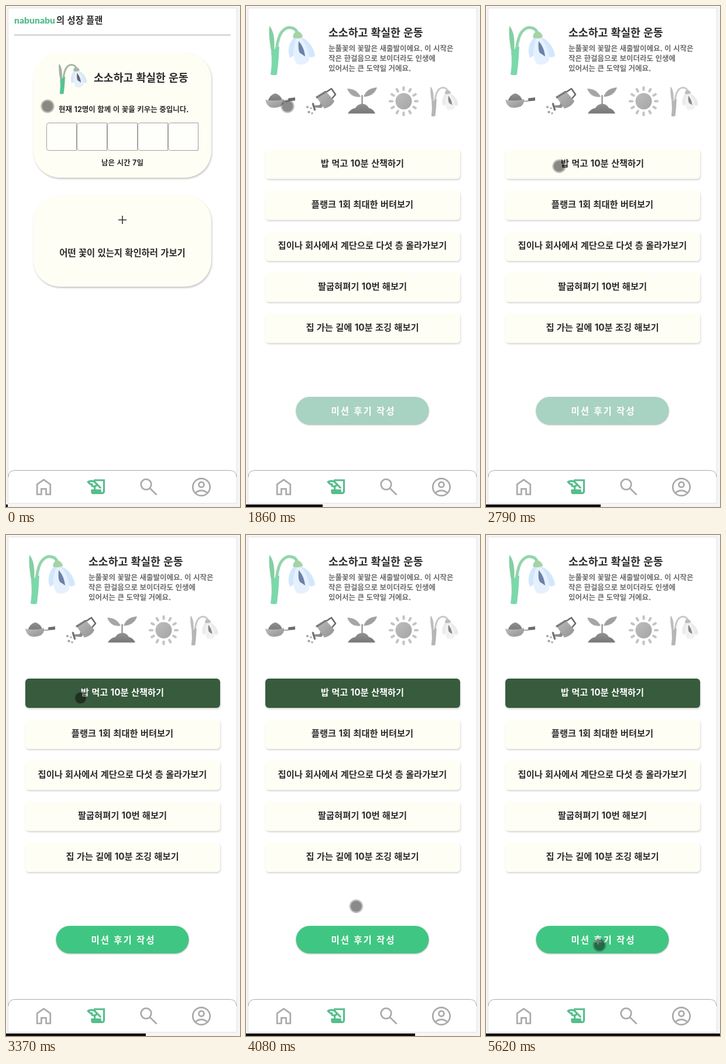
An HTML page for the animation above (5660 ms loop, 400 px wide and 855 px high).

```html
<!DOCTYPE html>
<html lang="ko">
<head>
<meta charset="utf-8">
<title>성장 플랜</title>
<style>
  html, body { margin: 0; width: 100%; height: 100%; overflow: hidden; background: #f5f5f5; }
  svg { display: block; width: 400px; height: 855px; }
  text { font-family: "Noto Sans CJK KR", "Noto Sans CJK", "Noto Sans KR", "Noto Sans", sans-serif; fill: #2c2c2c; }
  .num { font-family: Inter, sans-serif; }
  .brand { font-family: Lato, "Open Sans", sans-serif; font-weight: 900; fill: #55bd8c; }
  .card { fill: #fefef4; filter: drop-shadow(1px 2px 1.5px rgba(0, 0, 0, .24)); }
  .task { fill: #fefef4; filter: drop-shadow(1px 2px 1.5px rgba(0, 0, 0, .16)); }
  .send { fill: #a8d2c2; filter: drop-shadow(0 1.5px 1.2px rgba(0, 0, 0, .32)); }
  .done .first .task { fill: #375b3c; }
  .done .first text { fill: #fff; }
  .done .send { fill: #40c683; }
  .nav { fill: none; stroke: #a9a9a9; stroke-width: 2.7; }
</style>
</head>
<body>
<svg id="stage" viewBox="0 0 400 855" xmlns="http://www.w3.org/2000/svg">
  <defs>
    <linearGradient id="metal" x1="0" y1="0" x2="1" y2="1">
      <stop offset="0" stop-color="#bcbcbc"/><stop offset="1" stop-color="#929292"/>
    </linearGradient>
    <linearGradient id="glow" x1="0" y1="0" x2="1" y2="1">
      <stop offset="0" stop-color="#bdbdbd"/><stop offset="1" stop-color="#a5a5a5"/>
    </linearGradient>
    <linearGradient id="soil" x1="0" y1="0" x2="0" y2="1">
      <stop offset="0" stop-color="#929292"/><stop offset="1" stop-color="#777"/>
    </linearGradient>
  </defs>
  <rect x="3.5" y="3.5" width="391" height="845" fill="#fff" stroke="#e2e2e2"/>
  <g id="home"></g>
  <g id="plan"></g>
  <g id="nav">
    <path d="M4 848V804Q4 792.5 16 792.5H382Q394 792.5 394 804V848Z" fill="#fff"/>
    <path d="M4 804Q4 792.5 16 792.5H382Q394 792.5 394 804" fill="none" stroke="#aaa"/>
    <g class="nav">
      <path d="M53.2 833.5V816.5L64.5 808.5L75.8 816.5V833.5H68.6V824.2H60.4V833.5Z"/>
      <circle cx="239.5" cy="816.5" r="8.8"/>
      <path d="M246 823L257.5 834.3"/>
      <circle cx="334" cy="821" r="14.7"/>
      <circle cx="334" cy="816.8" r="4.5"/>
      <path d="M324 831C329.5 825.6 338.5 825.6 344 831"/>
    </g>
    <path transform="translate(135.8 801.3) scale(1.583)" fill="#55bd8c" d="M9 4v1.38c-.83-.33-1.72-.5-2.61-.5-1.79 0-3.58.68-4.95 2.05l3.33 3.33h1.11v1.11c.86.86 1.98 1.31 3.11 1.36V15H6v3c0 1.1.9 2 2 2h10c1.66 0 3-1.34 3-3V4H9zm-1.11 6.41V8.26H5.61L4.57 7.22a5.07 5.07 0 0 1 1.82-.34c1.34 0 2.59.52 3.54 1.46l1.41 1.41-.2.2a2.7 2.7 0 0 1-1.92.8c-.47 0-.93-.12-1.33-.34zM19 17c0 .55-.45 1-1 1s-1-.45-1-1v-2h-6v-2.59c.57-.23 1.1-.57 1.56-1.03l.2-.2L15.59 14H17v-1.41l-6-5.97V6h8v11z"/>
  </g>
  <g id="cursor">
    <circle r="9.4" fill="#000" fill-opacity=".46"/>
    <circle r="10.5" fill="none" stroke="#444" stroke-opacity=".36" stroke-width="2.2"/>
  </g>
  <rect id="bar" x="0" y="850.7" height="4.3" fill="#0a0a0a"/>
</svg>
<script>
const $ = id => document.getElementById(id);

// Text placed by its vertical centre, digits in a sans without foot serifs
const label = (x, cy, str, size, { anchor = 'middle', extra = '' } = {}) =>
  `<text x="${x}" y="${cy + size * .37}" font-size="${size}" font-weight="700" text-anchor="${anchor}" ${extra}>` +
  str.replace(/\d+/g, '<tspan class="num">$&</tspan>') + '</text>';
const start = { anchor: 'start' };

// Snowdrop drawn in an 80 by 85 box
const flower = (x, y, scale, c) => `
  <g transform="translate(${x} ${y}) scale(${scale})">
    <path d="M11 60C12 46 13 35 17 22C21 9 30 2 38 4C44 5 48 9 49 14" fill="none" stroke="${c.stalk}" stroke-width="5" stroke-linecap="round"/>
    <path d="M1 1C8 8 11 24 9 46L6 54C3 38-1 17 1 1Z" fill="${c.leaf}"/>
    <path d="M4 46Q10 39 18 36Q17 60 14 84Q8 86 3 84Q6 64 4 46Z" fill="${c.sheath}"/>
    <path d="M45 20C35 27 31 42 36 55C43 54 52 40 51 22Z" fill="${c.petal2}"/>
    <path d="M52 20C65 22 77 36 79 52C75 57 64 54 58 46Z" fill="${c.petal2}"/>
    <path d="M48 21C41 34 39 55 48 66C60 69 69 64 69 57C68 40 61 25 52 20Z" fill="${c.petal}"/>
    <path d="M51 27C50 37 51 44 53 47L62 53C61 43 57 33 51 27Z" fill="${c.mark}"/>
    <path d="M42 16Q45 8 52 11Q58 15 58 20Q50 24 41 21Z" fill="${c.cap}"/>
  </g>`;

const tints = {
  dim: { stalk: '#a3b9a9', leaf: '#9fafa4', sheath: '#56c394', petal: '#e4f0fd', petal2: '#d6e8fa', mark: '#64676b', cap: '#abb6a5' },
  fresh: { stalk: '#93d5ac', leaf: '#83cfa1', sheath: '#7bd8a9', petal: '#e6f1ff', petal2: '#d2e7fd', mark: '#6d80a6', cap: '#a5d3a6' },
  gray: { stalk: '#c9c9c9', leaf: '#bcbcbc', sheath: '#b5b5b5', petal: '#f2f2f2', petal2: '#e9e9e9', mark: '#85888f', cap: '#bdbdbd' }
};

const slots = [0, 1, 2, 3, 4].map(i => {
  const x = 69.5 + 52 * i;
  return `<path d="M${x + 51} 199.5H${x + 4}Q${x} 199.5 ${x} 203.5V242.5Q${x} 246.5 ${x + 4} 246.5H${x + 51}Z" fill="#fefefa" stroke="#a0a0a0"/>`;
}).join('');

$('home').innerHTML = `
  <text class="brand" x="14" y="29.5" font-size="15.7">nabunabu</text>
  ${label(86, 24, '의 성장 플랜', 15.4, start)}
  <path d="M14 49.5H384" stroke="#a0a0a0"/>
  <rect class="card" x="47" y="80" width="304" height="213" rx="45"/>
  ${flower(90, 98, .615, tints.dim)}
  ${label(150, 122, '소소하고 확실한 운동', 18.3, start)}
  ${label(90, 176, '현재 12명이 함께 이 꽃을 키우는 중입니다.', 12.5, start)}
  ${slots}
  ${label(199, 267, '남은 시간 7일', 12.5)}
  <rect class="card" x="47" y="323" width="304" height="156" rx="45"/>
  <path d="M192 365H206M199 358V372" stroke="#333" stroke-width="1.6"/>
  ${label(199, 421, '어떤 꽃이 있는지 확인하러 가보기', 15.4)}`;

const trowel = `
  <path d="M37 163Q41 151 50 149Q59 151 63 163Z" fill="url(#soil)"/>
  <path d="M33 160Q48 163 65 159Q66 166 60 171Q48 176 40 172Q34 167 33 160Z" fill="url(#metal)"/>
  <path d="M63 162.5H70Q73 162.5 73 159.5" fill="none" stroke="#a5a5a5" stroke-width="2.2"/>
  <path d="M72 157.5L84 156V161.5L73 162.5Z" fill="#6c6c6c"/>`;

const can = `
  <path d="M137 147L146 141L153 151L146 159" fill="none" stroke="#6a6a6a" stroke-width="2.6" stroke-linejoin="round"/>
  <path d="M136 164L129 174L115 173V170L126 169L129 160Z" fill="#8c8c8c"/>
  <path d="M120 155L136 145L151 162Q148 171 134 175Z" fill="url(#metal)"/>
  <path d="M119 155L136 144.5L138 147L121 158Z" fill="#7c7c7c"/>
  <path d="M114.5 167L117.5 177" stroke="#747474" stroke-width="3.4" stroke-linecap="round"/>
  <g fill="#a6a6a6"><circle cx="105" cy="172.5" r="2.1"/><circle cx="111" cy="174.5" r="1.6"/><circle cx="107.5" cy="181" r="2.2"/><circle cx="113" cy="183" r="1.7"/></g>`;

const sprout = `
  <path d="M198.5 169V152" stroke="#8c8c8c" stroke-width="2.2"/>
  <path d="M173 141Q189 141 196 155Q179 157 173 141Z" fill="#a6a6a6"/>
  <path d="M224 139Q219 154 201 155Q206 140 224 139Z" fill="#a0a0a0"/>
  <path d="M174 183.500Q178 176 187 174Q191 167 199 167Q206 167 210 174Q218 176 221 183.500Z" fill="url(#soil)"/>`;

const rays = Array.from({ length: 12 }, (_, i) =>
  `<path d="M0-19.5V-23.5" transform="rotate(${30 * i})"/>`).join('');
const sun = `
  <g transform="translate(269.5 162.5)" stroke="#c4c4c4" stroke-width="4.2" stroke-linecap="round">${rays}
    <circle r="14" fill="url(#glow)" stroke="none"/></g>`;

const tasks = ['밥 먹고 10분 산책하기', '플랭크 1회 최대한 버텨보기', '집이나 회사에서 계단으로 다섯 층 올라가보기',
  '팔굽혀펴기 10번 해보기', '집 가는 길에 10분 조깅 해보기'];
const taskList = tasks.map((str, i) => `
  <g class="${i ? '' : 'first'}">
    <rect class="task" x="33" y="${245 + 70 * i}" width="333" height="50" rx="6"/>
    ${label(199, 268 + 70 * i, str, 15.3)}
  </g>`).join('');

const about = ['눈풀꽃의 꽃말은 새출발이에요. 이 시작은', '작은 한걸음으로 보이더라도 인생에', '있어서는 큰 도약일 거에요.'];

$('plan').innerHTML = `
  ${flower(39, 33, 1, tints.fresh)}
  ${label(141, 45, '소소하고 확실한 운동', 18.3, start)}
  ${about.map((str, i) => label(141, 72 + 17 * i, str, 12.5, { anchor: 'start', extra: 'style="fill:#6c6c6c"' })).join('')}
  ${trowel}${can}${sprout}${sun}
  ${flower(315, 137, .605, tints.gray)}
  ${taskList}
  <rect class="send" x="85.5" y="667" width="227" height="47" rx="23.5"/>
  ${label(200.5, 691, '미션 후기 작성', 15.5, { extra: 'letter-spacing="2" style="fill:#fff"' })}`;

const LOOP = 5660, STEPS = 137;
// First step time, last step time, number of steps
const runs = [[40, 590, 14], [630, 1180, 14], [1220, 1780, 14], [1820, 2380, 15], [2430, 2960, 14],
  [3000, 3530, 14], [3570, 4110, 14], [4150, 4680, 14], [4720, 5280, 15], [5330, 5620, 8]];
const times = [0];
for (const [a, b, n] of runs)
  for (let k = 0; k < n; k++) times.push(Math.round((a + (b - a) * k / (n - 1)) / 10) * 10);

const OPEN = 1860, CHECK = 3330;
const part = (t, from, span) => Math.min(1, Math.max(0, (t - from) / span));
const out = (u, power) => 1 - (1 - u) ** power;

function cursorAt(t) {
  const u = part(t, 2060, 800), s = u * u * (3 - 2 * u);
  const v = part(t, 3610, 1000);
  return [71 + 56.5 * s + 66.5 * out(v, 4), 171 + 107 * s + 422 * out(v, 3)];
}

function draw(now) {
  const t = now % LOOP;
  let step = 0;
  while (step + 1 < STEPS && times[step + 1] <= t) step++;
  const at = times[step];
  const [x, y] = cursorAt(at);
  $('home').style.display = at < OPEN ? '' : 'none';
  $('plan').style.display = at < OPEN ? 'none' : '';
  $('stage').classList.toggle('done', at >= CHECK);
  $('cursor').setAttribute('transform', `translate(${x.toFixed(2)} ${y.toFixed(2)})`);
  $('bar').setAttribute('width', Math.round(400 * (step + 1) / STEPS));
}

const begin = performance.now();
function tick() {
  draw(performance.now() - begin);
  requestAnimationFrame(tick);
}
tick();
</script>
</body>
</html>
```
